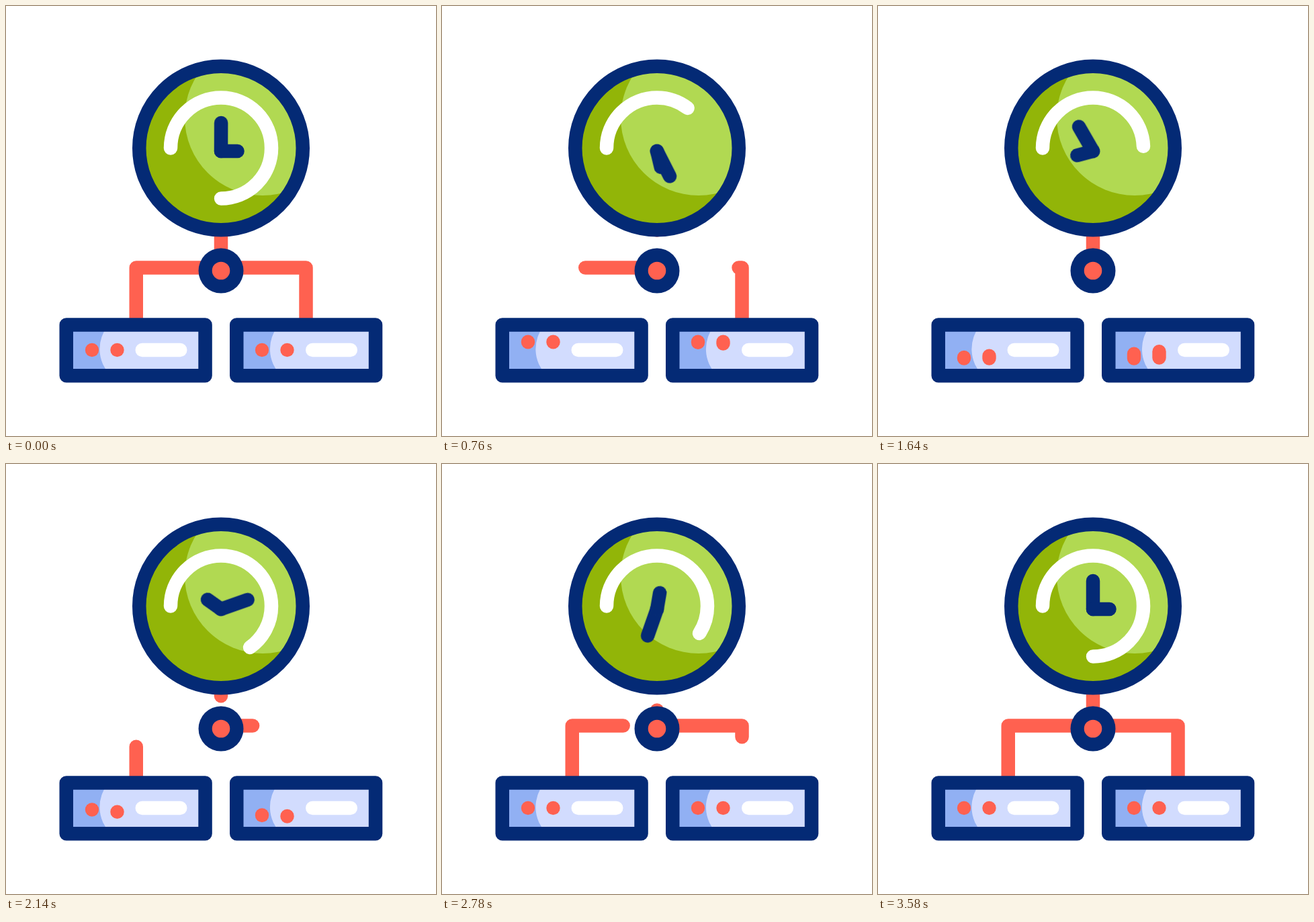
Recreate the animation shown at these times as an HTML page. Size 640 px wide and 640 px high, loop 3600 ms.

```html
<!DOCTYPE html>
<html lang="en">
<head>
<meta charset="utf-8">
<title>Server clock</title>
<style>
  @property --top { syntax: "<number>"; inherits: false; initial-value: 512; }
  @property --bottom { syntax: "<number>"; inherits: false; initial-value: 512; }

  :root {
    --navy: #042a75;
    --red: #ff6150;
    --both: cubic-bezier(.333, 0, .667, 1);
    --out: cubic-bezier(.167, .167, .667, 1);
    --in: cubic-bezier(.333, 0, .833, .833);
  }
  html, body { margin: 0; width: 100%; height: 100%; overflow: hidden; background: #fff; }
  svg { display: block; width: 100vw; height: 100vh; }

  .line { fill: none; stroke-width: 20.5; stroke-linecap: round; stroke-linejoin: round; }
  .navy { stroke: var(--navy); }
  .red { stroke: var(--red); }
  .trim { stroke-dasharray: 1 2; }

  .minute, .hour { transform-origin: 320px 216px; animation: minute 3600ms linear infinite; }
  .hour { animation-name: hour; }
  .arc { stroke: #fff; animation: arc 3600ms infinite var(--both); }
  .stem { animation: stem 3600ms infinite; }
  .left { animation: left 3600ms infinite; }
  .right { animation: right 3600ms infinite; }
  .dot {
    fill: var(--red);
    y: calc(var(--top) * 1px - 10.2px);
    height: calc((var(--bottom) - var(--top)) * 1px + 20.4px);
    animation: top 3600ms infinite var(--both), bottom 3600ms infinite var(--both);
    animation-delay: var(--wait);
  }

  @keyframes minute { 99.444%, 100% { transform: rotate(720deg); } }
  @keyframes hour { 99.444%, 100% { transform: rotate(360deg); } }

  @keyframes arc {
    0% { stroke-dashoffset: 0; animation-timing-function: var(--out); }
    27.222% { stroke-dashoffset: .545; }
    66.667% { stroke-dashoffset: .09; }
    83.333% { stroke-dashoffset: .265; animation-timing-function: var(--in); }
    99.444%, 100% { stroke-dashoffset: 0; }
  }
  /* Each link drains off its far end, then refills from its start. */
  @keyframes stem {
    0% { stroke-dashoffset: 0; animation-timing-function: var(--out); }
    24.86% { stroke-dashoffset: -1; animation-timing-function: step-end; }
    24.861% { stroke-dashoffset: 1; animation-timing-function: var(--in); }
    49.722% { stroke-dashoffset: 0; animation-timing-function: var(--out); }
    74.582% { stroke-dashoffset: -1; animation-timing-function: step-end; }
    74.583% { stroke-dashoffset: 1; animation-timing-function: var(--in); }
    99.444%, 100% { stroke-dashoffset: 0; }
  }
  @keyframes left {
    0% { stroke-dashoffset: 0; animation-timing-function: cubic-bezier(.167, .29, .75, .85); }
    45% { stroke-dashoffset: -1; animation-timing-function: step-end; }
    49.722% { stroke-dashoffset: 1; animation-timing-function: var(--in); }
    99.444%, 100% { stroke-dashoffset: 0; }
  }
  @keyframes right {
    0% { stroke-dashoffset: 0; animation-timing-function: cubic-bezier(.167, .2, .75, .9); }
    45% { stroke-dashoffset: -1; animation-timing-function: step-end; }
    49.722% { stroke-dashoffset: 1; animation-timing-function: cubic-bezier(.21, 0, .64, 1); }
    99.444%, 100% { stroke-dashoffset: 0; }
  }
  @keyframes top {
    0% { --top: 512; }
    12.222%, 22.222% { --top: 499.7; }
    48.889% { --top: 524; }
    52.222% { --top: 524; animation-timing-function: var(--in); }
    66.667%, 100% { --top: 512; }
  }
  @keyframes bottom {
    0% { --bottom: 512; }
    17.778%, 21.667% { --bottom: 500.3; }
    39.444% { --bottom: 524.6; }
    52.222% { --bottom: 524.6; animation-timing-function: var(--in); }
    66.667%, 100% { --bottom: 512; }
  }
</style>
</head>
<body>
<svg viewBox="0 0 640 640">
  <defs>
    <clipPath id="face"><circle cx="320" cy="211.5" r="118"/></clipPath>
    <clipPath id="panel"><rect x="92" y="477" width="202" height="71"/></clipPath>
    <g id="box">
      <g clip-path="url(#panel)">
        <rect x="90" y="475" width="206" height="75" fill="#d2dcfe"/>
        <path d="M90 475H152.500A55 55 0 0 0 156 550H90Z" fill="#91b0f3"/>
      </g>
      <rect class="line navy" x="89.75" y="474.500" width="206.800" height="75.750"/>
      <rect x="192.500" y="501.800" width="77" height="20.400" rx="10.200" fill="#fff"/>
    </g>
  </defs>

  <path class="line red trim stem" pathLength="1" d="M320 370.500V333"/>
  <path class="line red trim left" pathLength="1" d="M193.750 475V389.500H298"/>
  <path class="line red trim right" pathLength="1" d="M336 389.500H446.500V475"/>

  <circle cx="320" cy="211.500" r="118" fill="#92b508"/>
  <circle cx="382" cy="166" r="116" fill="#b1d952" clip-path="url(#face)"/>
  <circle class="line navy" cx="320" cy="211.500" r="121.750"/>
  <path class="line trim arc" pathLength="1" d="M245 211.500A75 75 0 1 1 320 286.500"/>
  <path class="line navy minute" d="M320 216V174"/>
  <path class="line navy hour" d="M320 216H344.500"/>

  <circle cx="320" cy="394" r="33.500" fill="#042a75"/>
  <circle cx="320" cy="394" r="13.300" fill="#ff6150"/>

  <use href="#box"/>
  <use href="#box" x="253.500"/>
  <rect class="dot" x="117.800" width="20.400" rx="10.200" style="--wait: 0ms"/>
  <rect class="dot" x="155.300" width="20.400" rx="10.200" style="--wait: 100ms"/>
  <rect class="dot" x="370.800" width="20.400" rx="10.200" style="--wait: 200ms"/>
  <rect class="dot" x="408.300" width="20.400" rx="10.200" style="--wait: 300ms"/>
</svg>
</body>
</html>
```
